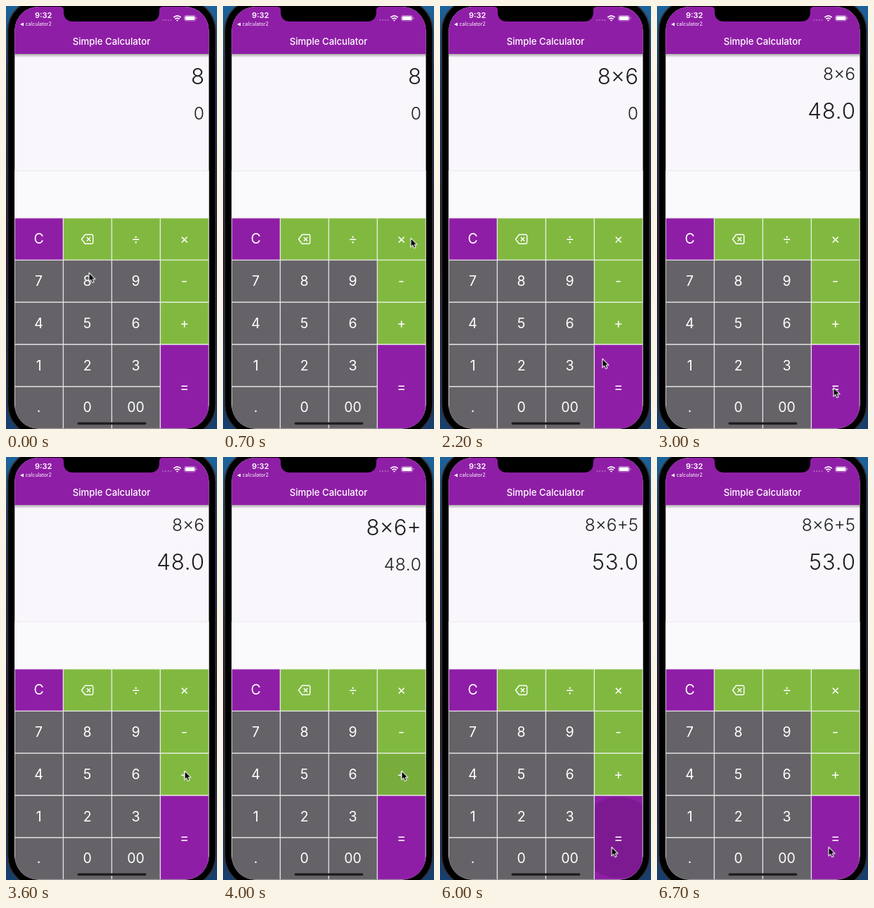
Recreate the animation shown at these times as an HTML page. Size 300x600 px, loop 7600 ms.

```html
<!DOCTYPE html>
<html lang="en">
<head>
<meta charset="utf-8">
<title>Simple Calculator</title>
<style>
  html, body { margin: 0; width: 100%; height: 100%; overflow: hidden; background: #000; }
  svg { display: block; }
  text { font-family: Inter, Roboto, sans-serif; font-optical-sizing: none; }

  .display text { fill: #1f1e22; text-anchor: end; font-size: 24.6px; font-weight: 350; }
  .display .big { font-size: 31.2px; }
  .display .result { letter-spacing: .025em; }
  .keys text { fill: #fff; text-anchor: middle; font-size: 19.5px; }

  .display { animation: display 7.6s step-end infinite; }
  .cursor { animation: cursor 7.6s ease-in-out infinite; }
  .ripple {
    opacity: 0;
    transform-box: fill-box;
    transform-origin: center;
    animation: ripple 7.6s linear infinite;
  }

  /* Each display state sits 240px below the previous one */
  @keyframes display {
    0% { transform: translateY(0); }
    11.842% { transform: translateY(-240px); }
    23.684% { transform: translateY(-480px); }
    34.21% { transform: translateY(-720px); }
    50% { transform: translateY(-960px); }
    64.473% { transform: translateY(-1200px); }
    77.631%, 100% { transform: translateY(-1440px); }
  }
  @keyframes cursor {
    0% { transform: translate(118px, 379px); }
    8.55%, 13.82% { transform: translate(267px, 330px); }
    19.73%, 25.66% { transform: translate(201px, 440px); }
    31.58%, 42.1% { transform: translate(251px, 542px); }
    47.37%, 55.26% { transform: translate(254px, 446px); }
    62.5%, 68.42% { transform: translate(113px, 451px); }
    73.68%, 100% { transform: translate(244px, 554px); }
  }
  @keyframes ripple {
    0% { transform: scale(.15); opacity: 0; }
    1.3% { opacity: .12; }
    3.29% { transform: scale(1); opacity: .13; }
    4.2% { opacity: .12; }
    6.58%, 100% { transform: scale(1); opacity: 0; }
  }
</style>
</head>
<body>
<svg width="300" height="600" viewBox="0 0 300 600">
  <defs>
    <linearGradient id="desk" x2="0" y2="1">
      <stop offset="0" stop-color="#1c639c"/>
      <stop offset=".2" stop-color="#1d3a5e"/>
      <stop offset=".6" stop-color="#2b1938"/>
      <stop offset="1" stop-color="#17406f"/>
    </linearGradient>
    <linearGradient id="shade" x2="0" y2="1">
      <stop offset="0" stop-opacity=".32"/>
      <stop offset="1" stop-opacity="0"/>
    </linearGradient>
    <clipPath id="screen"><rect x="12.3" y="1" width="276.2" height="598.6" rx="34"/></clipPath>
    <clipPath id="panel"><rect x="12" y="74" width="277" height="158"/></clipPath>
  </defs>

  <rect width="300" height="600" fill="url(#desk)"/>
  <rect x="2.5" y="-9" width="295.5" height="618.5" rx="44" stroke="#323136" stroke-width="1.5"/>

  <g clip-path="url(#screen)">
    <rect width="300" height="600" fill="#f9f7fb"/>
    <rect y="234" width="300" height="67" fill="#faf9fc"/>
    <path d="M12 233.8H289" stroke="#ebeaee"/>
    <rect y="68" width="300" height="5" fill="url(#shade)"/>
    <rect width="300" height="68" fill="#8f1ea6"/>
    <g class="keys" id="keys"></g>
    <rect x="101.5" y="590.4" width="98" height="3.4" rx="1.7" fill="#1c1b1d"/>
  </g>

  <path d="M77 0V1q5 0 5 5v2q0 14 14 14h108q14 0 14-14v-2q0-5 5-5V0z"/>

  <g fill="#fff">
    <text x="41" y="17" font-size="11" font-weight="600">9:32</text>
    <path d="M20 26l5-2.6v5.2z"/>
    <text x="27.5" y="28.4" font-size="7.1">calculator2</text>
    <text x="150" y="54.7" font-size="13.2" font-weight="500" text-anchor="middle">Simple Calculator</text>
    <path d="M222.5 20H236" stroke="#fff" stroke-opacity=".4" stroke-width="1.6" stroke-dasharray="1.7 2"/>
    <path d="M238.3 16.2q5.2-4.6 10.4 0M240.4 18.5q3.1-2.7 6.2 0" fill="none" stroke="#fff" stroke-width="1.7"/>
    <path d="M241.9 20q1.6-1.2 3.2 0l-1.6 1.7z"/>
    <rect x="253.5" y="13.5" width="16" height="7.6" rx="2.2" fill="none" stroke="#fff" stroke-opacity=".5" stroke-width=".8"/>
    <rect x="254.6" y="14.6" width="13.8" height="5.4" rx="1.3"/>
    <path d="M270.4 16v2.6q1.2-.3 1.2-1.3t-1.2-1.3z" opacity=".6"/>
  </g>

  <g clip-path="url(#panel)"><g class="display" id="display"></g></g>

  <g class="cursor">
    <path d="M0 0V13.6L3.1 10.8L5.1 15.4L7.6 14.3L5.6 9.9H9.9Z" transform="translate(0 -.7) scale(.92)"
          stroke="#fff" stroke-width="1.1" stroke-linejoin="round"/>
  </g>
</svg>

<script>
  const GREEN = '#81b940', GREY = '#656367', PURPLE = '#8f1ea6';
  const COL = 69, ROW = 59.8, LEFT = 12.4, TOP = 300.6;
  const LOOP = 7600;

  // Times in ms at which each key is pressed
  const presses = { '×': [800], '6': [1700], '=': [2500, 5800], '+': [3600], '5': [4800] };

  const rows = [
    ['C', '⌫', '÷', '×'],
    ['7', '8', '9', '-'],
    ['4', '5', '6', '+'],
    ['1', '2', '3', '='],
    ['.', '0', '00']
  ];

  const backspace = `<path fill="none" stroke="#fff" stroke-width="1.4" stroke-linejoin="round"
    d="M112.5 324.2H122q1.7 0 1.7 1.7v9.6q0 1.7-1.7 1.7h-9.5l-5-6.5zM114.8 327.9l5.4 5.6m0-5.6l-5.4 5.6"/>`;

  function keyColor(label, row, col) {
    if (label === 'C' || label === '=') return PURPLE;
    return row === 0 || col === 3 ? GREEN : GREY;
  }

  function key(label, row, col) {
    const x = LEFT + col * COL, y = TOP + row * ROW;
    const height = label === '=' ? ROW * 2 : ROW;
    const cx = COL / 2, cy = height / 2;
    const ripples = (presses[label] || []).map(time =>
      `<circle class="ripple" cx="${cx}" cy="${cy}" r="${Math.hypot(cx, cy)}"
        style="animation-delay:${time - LOOP}ms"/>`).join('');
    const face = label === '⌫' ? backspace
      : `<text x="${x + cx - .3}" y="${y + cy + 6.7}">${label}</text>`;
    return `<svg x="${x}" y="${y}" width="${COL}" height="${height}" overflow="hidden">
      <rect width="100%" height="100%" fill="${keyColor(label, row, col)}"/>${ripples}
      <rect width="100%" height="100%" fill="none" stroke="#fbfafc" stroke-width="1.3"/>
    </svg>${face}`;
  }

  document.getElementById('keys').innerHTML =
    rows.map((row, r) => row.map((label, c) => key(label, r, c)).join('')).join('');

  // Expression, result, and whether the result is the enlarged line
  const states = [
    ['8', '0'], ['8×', '0'], ['8×6', '0'], ['8×6', '48.0', true],
    ['8×6+', '48.0'], ['8×6+5', '48.0'], ['8×6+5', '53.0', true]
  ];

  document.getElementById('display').innerHTML = states.map(([sum, result, solved], i) => {
    const y = i * 240;
    return solved
      ? `<text x="282" y="${y + 105}">${sum}</text><text class="big result" x="282.7" y="${y + 159.6}">${result}</text>`
      : `<text class="big" x="282" y="${y + 111.4}">${sum}</text><text class="result" x="282.6" y="${y + 161}">${result}</text>`;
  }).join('');
</script>
</body>
</html>
```
